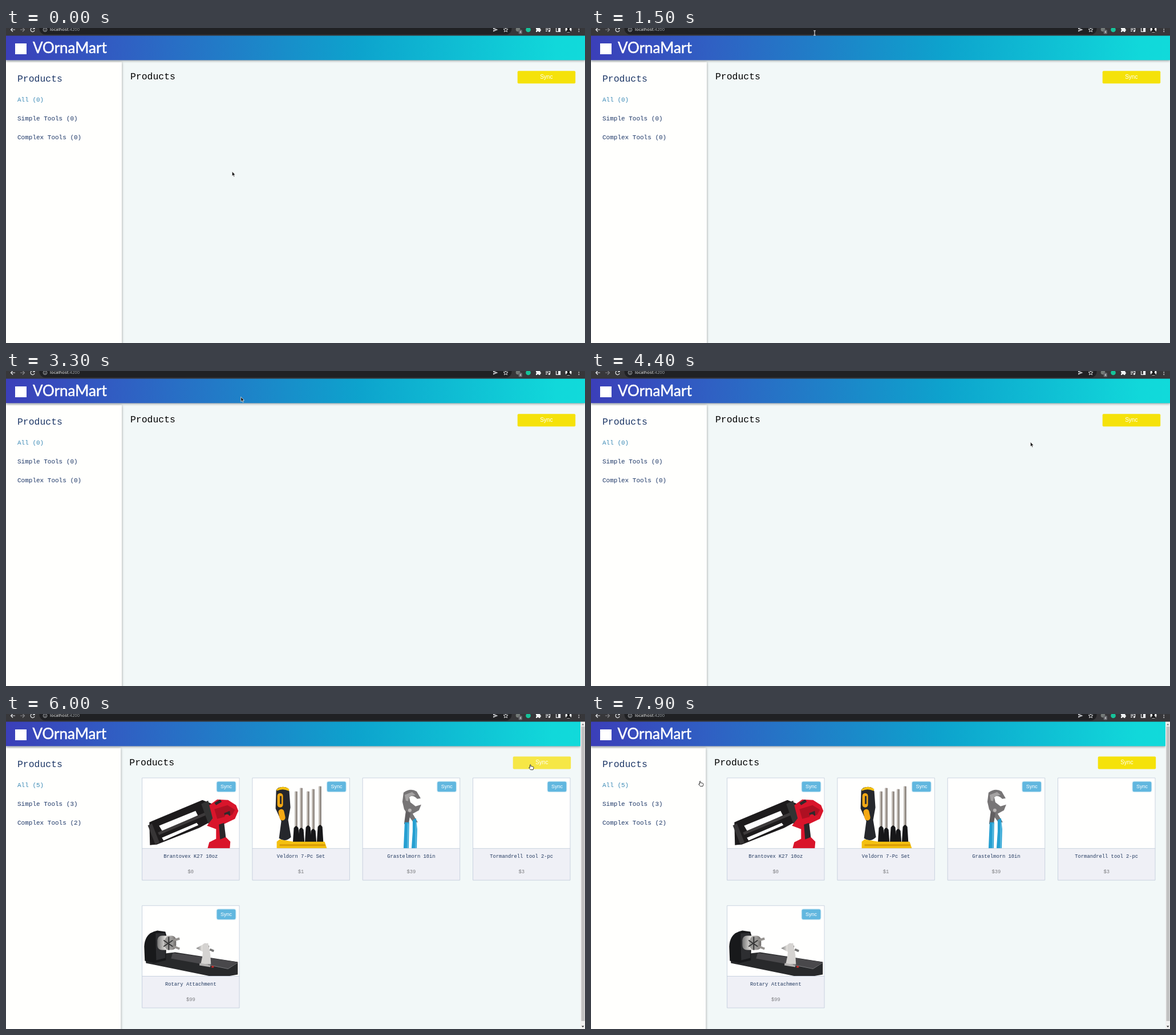
These frames come from a looping animation (1015x552 px, 8 s). An HTML page:

```html
<!DOCTYPE html>
<html lang="en">
<head>
<meta charset="utf-8">
<title>Tool shop</title>
<style>
  html, body { margin: 0; width: 100%; height: 100%; overflow: hidden; background: #f2f8f8; }
  svg { display: block; width: 100%; height: 100%; }
  text { white-space: pre; }
  .mono { font-family: "Liberation Mono", monospace; }
  .sans { font-family: "Liberation Sans", sans-serif; fill: #fff; text-anchor: middle; }
  .url { font: 7.7px "Noto Sans", sans-serif; }
  .brand { font: 26px Lato, sans-serif; fill: #fff; stroke: #fff; stroke-width: .5; }
  .mid { text-anchor: middle; }
  .icon { fill: none; stroke: #e8eaed; stroke-width: 1.2; }
  .shadow { filter: drop-shadow(0 1px 2px #0006); }
</style>
</head>
<body>
<svg id="stage" viewBox="0 0 1015 552" preserveAspectRatio="none">
  <defs>
    <linearGradient id="sky">
      <stop offset="0" stop-color="#3b3fb9"/>
      <stop offset=".2" stop-color="#305fc3"/>
      <stop offset=".61" stop-color="#0da3cd"/>
      <stop offset=".95" stop-color="#11d8da"/>
      <stop offset="1" stop-color="#11dada"/>
    </linearGradient>
    <linearGradient id="steel">
      <stop offset="0" stop-color="#777"/>
      <stop offset=".45" stop-color="#e4e2df"/>
      <stop offset="1" stop-color="#6b6866"/>
    </linearGradient>
    <clipPath id="photo"><path d="M0 0H171V124H0Z"/></clipPath>
  </defs>
  <g id="empty"></g>
  <g id="filled"></g>

  <path fill="#37373a" d="M0 0H1015V13.500H0Z"/>
  <rect x="58.500" y="-10" width="828" height="21.500" rx="10" fill="#202124"/>
  <rect id="ring" x="59" y="-10" width="827.500" height="21.300" rx="10" fill="none" stroke="#5d7fd6" stroke-width="1.300"/>
  <path id="selection" fill="#a5c8f5" d="M77 0H129V7.500H77Z"/>
  <text class="url" x="77" y="5.300" fill="#f1f3f4" id="host">localhost<tspan id="port" fill="#9aa0a6">:4200</tspan></text>
  <g class="icon">
    <path d="M16 3H8.500M12 -.5 8.500 3 12 6.500"/>
    <path stroke="#85868a" d="M25 3H32.500M29 -.5 32.500 3 29 6.500"/>
    <path id="reload" d="M49.500 1A3.500 3.500 0 1 0 50 4M50 -1V1.500H47"/>
    <path id="stop" d="M43.800 0 50 6.200M50 0 43.800 6.200"/>
    <g stroke="#bdc1c6" stroke-width=".9"><circle cx="68.500" cy="3" r="3.300"/><path d="M68.500 2.500V5M68.500 .7V1.600"/></g>
    <path fill="#c8cace" stroke="none" d="M854 -.5 862.500 3 854 6.500V4L859 3 854 2Z"/>
    <path stroke-width=".9" d="M876 -1 877 1.800 880 2 877.700 3.900 878.500 6.700 876 5.200 873.500 6.700 874.300 3.900 872 2 875 1.800Z"/>
    <path stroke-width="1.300" d="M946 0H953M946 2.700H951M946 5.400H949M953.500 0V5.500"/><circle cx="952.300" cy="5.300" r="1" fill="#e8eaed"/>
    <path d="M964.500 -1H971.500V6.300H964.500Z"/><path fill="#e8eaed" d="M968.500 -1H971.500V6.300H968.500Z"/>
  </g>
  <circle cx="897.500" cy="2.500" r="3.800" fill="#747a78"/>
  <rect x="898.500" y="3" width="6.500" height="7.500" rx="1.500" fill="#606267"/>
  <text class="sans" x="901.800" y="9" font-size="6.500">x</text>
  <circle cx="915.500" cy="3" r="4.300" fill="#16c39a"/>
  <path fill="#f1f3f4" d="M929 0H931.500A1.600 1.600 0 0 1 934.500 0H936.500V2A1.500 1.500 0 0 1 936.500 5V7H934A1.500 1.500 0 0 0 931 7H929V4.800A1.500 1.500 0 0 0 929 2Z"/>
  <circle cx="986" cy="2.500" r="5.500" fill="#eee"/>
  <path fill="#17181a" d="M982 7.200Q982 3.500 985 3.300A2.300 2.800 0 1 1 987 3.300Q990 3.500 990 7.200Z"/>
  <path fill="#e8eaed" d="M1003.500 -1h1.600v1.600h-1.600ZM1003.500 2.200h1.600v1.600h-1.600ZM1003.500 5.400h1.600v1.600h-1.600Z"/>

  <g id="cursor">
    <path id="arrow" fill="#151515" stroke="#fff" stroke-width=".7" d="M.3 .3V8.500L2.200 6.900 3.600 9.900 4.900 9.300 3.600 6.400H6Z"/>
    <path id="beam" fill="none" stroke="#eee" stroke-width="1.100" d="M-1.800 -3.800H1.800M-1.800 4.200H1.800M0 -3.800V4.200"/>
    <path id="hand" fill="#fff" stroke="#222" stroke-width=".9" d="M2.500 6V1.200Q3.300 -.2 4 1.200V3.500L8 4.300Q9.200 4.800 8.900 6.500L8 9.700H3.600L.6 6.200Q.6 4.800 2.500 6Z"/>
  </g>
</svg>
<script>
const $ = id => document.getElementById(id);
const rect = (x, y, w, h, fill, more = '') =>
  `<rect x="${x}" y="${y}" width="${w}" height="${h}" fill="${fill}" ${more}/>`;
const path = (d, fill, more = '') => `<path d="${d}" fill="${fill}" ${more}/>`;
const line = (d, color, width) => path(d, 'none', `stroke="${color}" stroke-width="${width}"`);
const mono = (x, y, size, fill, text, more = 'class="mono"') =>
  `<text x="${x}" y="${y}" font-size="${size}" fill="${fill}" ${more}>${text}</text>`;

// Product pictures, drawn relative to the card's corner.
const caulkGun =
  path('M13 78 106 39 124 46 126 74 100 88 26 117 14 118Z', '#1d1b1c') +
  path('M30 84 94 58 98 66 36 94ZM35 105 96 79 99 83 38 110Z', '#fdfdfd') +
  line('M29 98 112 63', '#3d3a3b', 5) +
  line('M14 82 27 115', '#373536', 8) +
  path('M104 46 116 40 128 78 117 82Z', '#333') +
  path('M118 48 132 38 151 39 165 48 169 58 163 72 142 82 146 103 155 112 154 124H115L118 113 130 107 130 90 114 84 124 71Z', '#d9152b') +
  path('M127 55 150 48 163 56 158 65 132 72Z', '#ae1022') +
  path('M135 82 144 79 147 104 137 108Z', '#29272a') +
  path('M127 44 137 38 140 42 130 48ZM144 62 154 58 155 66 146 69Z', '#302a2c') +
  `<circle cx="149" cy="68" r="4" fill="#d9152b"/>`;

const screwdrivers =
  [[77, 24, 88], [86, 18, 91], [98, 24, 87], [107, 20, 93], [119, 15, 86]].map(([x, top, end]) =>
    line(`M${x} ${top}V${end}`, '#6b625b', 4) + line(`M${x - .5} ${top}V${end}`, '#d8d1ca', 1.5) +
    path(`M${x - 4} ${end}Q${x} ${end - 7} ${x + 4} ${end}L${x + 6} 118H${x - 6}Z`, '#171719')).join('') +
  path('M43 112 48 108 72 112 127 112 131 124H43Z', '#f4c010') +
  path('M42 22Q44 16 54 16Q64 16 65 24L67 52 63 74 68 104Q58 114 47 106L51 76 41 54Z', '#25272c') +
  path('M43 20Q54 12 65 20L64 23Q53 18 43 23Z', '#f4c010') +
  rect(44, 27, 10, 25, '#f5a914', 'rx="5"') +
  rect(47, 55, 10, 20, '#f5a914', 'rx="5" transform="rotate(-12 52 65)"') +
  line('M50 32V46', '#30302f', 3) + line('M48 118H128', '#d99b06', 3);

const pliers =
  path('M72 26Q84 17 95 24L102 36 96 37Q88 29 82 34L84 43 93 50 103 47 99 57 88 63 97 78H89L79 64 73 55 70 42Z', '#777576') +
  path('M74 30 87 25 93 30 82 33 80 41 76 40Z', '#a4a2a2') +
  path('M76 58 84 62 81 81H73Z', '#625f61') +
  path('M74 78H82L81 124H72ZM88 74 94 71 96 90 95 124H86L88 94Z', '#269fd1') +
  line('M80 80 79 124M94 78 93 124', '#70c6e6', 1.3) +
  `<circle cx="83" cy="57" r="3" fill="#b8b5b5"/>`;

const rotary =
  path('M6 88 58 82 168 99V121L151 124H120L7 101Z', '#28292b') +
  path('M54 83 167 99 151 111 51 93Z', '#49484b') +
  path('M4 72Q5 48 27 44L41 46 43 53 42 96 22 101 5 97Z', '#18191b') +
  path('M24 49 40 48 41 92 25 96Z', '#2d2e31') +
  rect(27, 53, 33, 25, 'url(#steel)', 'rx="8"') +
  `<ellipse cx="47" cy="66" rx="8" ry="12" fill="#9a9997"/>` +
  line('M47 55V78M38 61 54 72M38 72 54 61', '#353536', 2) +
  line('M56 61 66 58M56 72 66 76', '#969390', 4) +
  path('M95 75 111 66 118 71 117 81 110 83Z', 'url(#steel)') +
  path('M108 67 116 66 120 86 121 103 103 103 106 89Z', '#d5d3d1') +
  line('M119 77 126 80', '#777', 4) + line('M101 103 120 106', '#b5b3b2', 4) +
  line('M116 104 151 111 168 100', '#77777a', 1) + path('M122 106h4v3h-4Z', '#c62828');

const products = [
  ['Brantovex K27 10oz', '$0', caulkGun],
  ['Veldorn 7-Pc Set', '$1', screwdrivers],
  ['Grastelmorn 10in', '$39', pliers],
  ['Tormandrell tool 2-pc', '$3', ''],
  ['Rotary Attachment', '$99', rotary]
];

function card([name, price, picture], i) {
  const x = 238.3 + i % 4 * 193.3, y = 111.7 + Math.floor(i / 4) * 223.8;
  return `<g transform="translate(${x} ${y})">
    ${rect(0, 0, 171, 179.5, '#fffffe')}
    <g clip-path="url(#photo)">${picture}</g>
    ${rect(0, 124, 171, 55.500, '#eff0f6')}
    ${line('M0 124H171M.3 .3H170.800V179.500H.3Z', '#c5cedd', .9)}
    ${rect(131.5, 7, 32.500, 17.300, '#61b7df', 'rx="2" style="filter:drop-shadow(0 0 1px #61b7df)"')}
    <text class="sans" x="147.800" y="18.800" font-size="9">Sync</text>
    ${mono(85.5, 140.2, 8.8, '#233a60', name, 'class="mono mid"')}
    ${mono(85.5, 167.6, 8.8, '#7c7d80', price, 'class="mono mid"')}
  </g>`;
}

// The page is slightly narrower once a scrollbar is present.
function page(width, side, lift, [all, simple, complex], buttonId) {
  const menu = [['All', all], ['Simple Tools', simple], ['Complex Tools', complex]];
  return rect(0, 13, width, 539, '#f2f8f8') +
    rect(0, 59.5, side, 500, '#fffffd', 'class="shadow"') +
    rect(0, 13, width, 43.3, 'url(#sky)', 'class="shadow"') +
    rect(16, 27, 20, 19, '#fff') +
    `<text class="brand" x="${47 - lift}" y="44">VOrnaMart</text>` +
    mono(20, 94 - lift, 16.45, '#1d3767', 'Products') +
    menu.map(([label, count], i) => mono(20, 128.8 - lift + i * (33 - lift / 2), 11,
      i ? '#1d3767' : '#3c8bb6', `${label} (${count})`)).join('') +
    mono(side + 15, 90 - lift / 2, 16.45, '#000', 'Products') +
    rect(width - 118.3, 75.2 - lift, 101.5, 22, '#f5e20a', `rx="2" id="${buttonId}"`) +
    `<text class="sans" x="${width - 67.7}" y="${88.7 - lift}" font-size="10">Sync</text>`;
}

$('empty').innerHTML = page(1015, 203, 0, [0, 0, 0], 'emptySync');
$('filled').innerHTML = page(1007, 201.3, .6, [5, 3, 2], 'filledSync') +
  products.map(card).join('') +
  rect(1007, 13, 8, 539, '#f1f1f1') + rect(1008.5, 22, 6, 516, '#c1c1c1') +
  path('M1009 19.500H1013.500L1011.200 16.800Z', '#777') +
  path('M1009 546.500H1013.500L1011.200 549.200Z', '#333');

// Pointer stops: time, x, y, shape.
const stops = [
  [0, 396, 251, 'arrow'], [400, 393, 205, 'arrow'], [600, 387, 123, 'arrow'],
  [800, 381, 70, 'arrow'], [900, 378.7, 52, 'arrow'],
  [1100, 379, 46, 'arrow'], [1200, 382, 34, 'arrow'], [1300, 386, 22, 'arrow'],
  [1400, 390, 11, 'beam'], [1500, 392, 8.5, 'beam'],
  [3300, 411.5, 45, 'arrow'], [3500, 415, 55, 'arrow'],
  [3800, 450, 70, 'arrow'], [3900, 535, 100, 'arrow'], [4000, 635, 128, 'arrow'], [4100, 683, 137, 'arrow'],
  [4400, 770, 124, 'arrow'], [4500, 836.5, 113, 'arrow'],
  [4700, 868, 105, 'arrow'], [4800, 894, 98, 'arrow'], [4900, 911, 91, 'hand'], [5000, 916, 88, 'hand'],
  [7300, 650, 87, 'arrow'], [7400, 444.5, 85, 'arrow'],
  [7800, 290, 102, 'arrow'], [7900, 188, 117, 'hand']
];
const show = (id, on) => $(id).style.display = on ? '' : 'none';

function draw(t) {
  const between = (from, to) => t >= from && t < to;
  const [, x, y, shape] = stops.findLast(stop => stop[0] <= t);
  $('cursor').setAttribute('transform', `translate(${x} ${y})`);
  for (const id of ['arrow', 'beam', 'hand']) show(id, id === shape);

  show('empty', t < 6000);
  show('filled', t >= 6000);
  const syncColor = between(4900, 7300) ? '#f6e746' : '#f5e20a';
  for (const id of ['emptySync', 'filledSync']) $(id).setAttribute('fill', syncColor);

  const focused = between(1900, 2400), loading = between(2400, 2800);
  show('ring', focused);
  show('selection', focused);
  $('host').setAttribute('fill', focused ? '#29344a' : '#f1f3f4');
  $('port').setAttribute('fill', focused ? '#29344a' : '#9aa0a6');
  show('reload', !loading);
  show('stop', loading);
}

const start = performance.now();
function tick() {
  draw((performance.now() - start) % 8000);
  requestAnimationFrame(tick);
}
tick();
</script>
</body>
</html>
```
